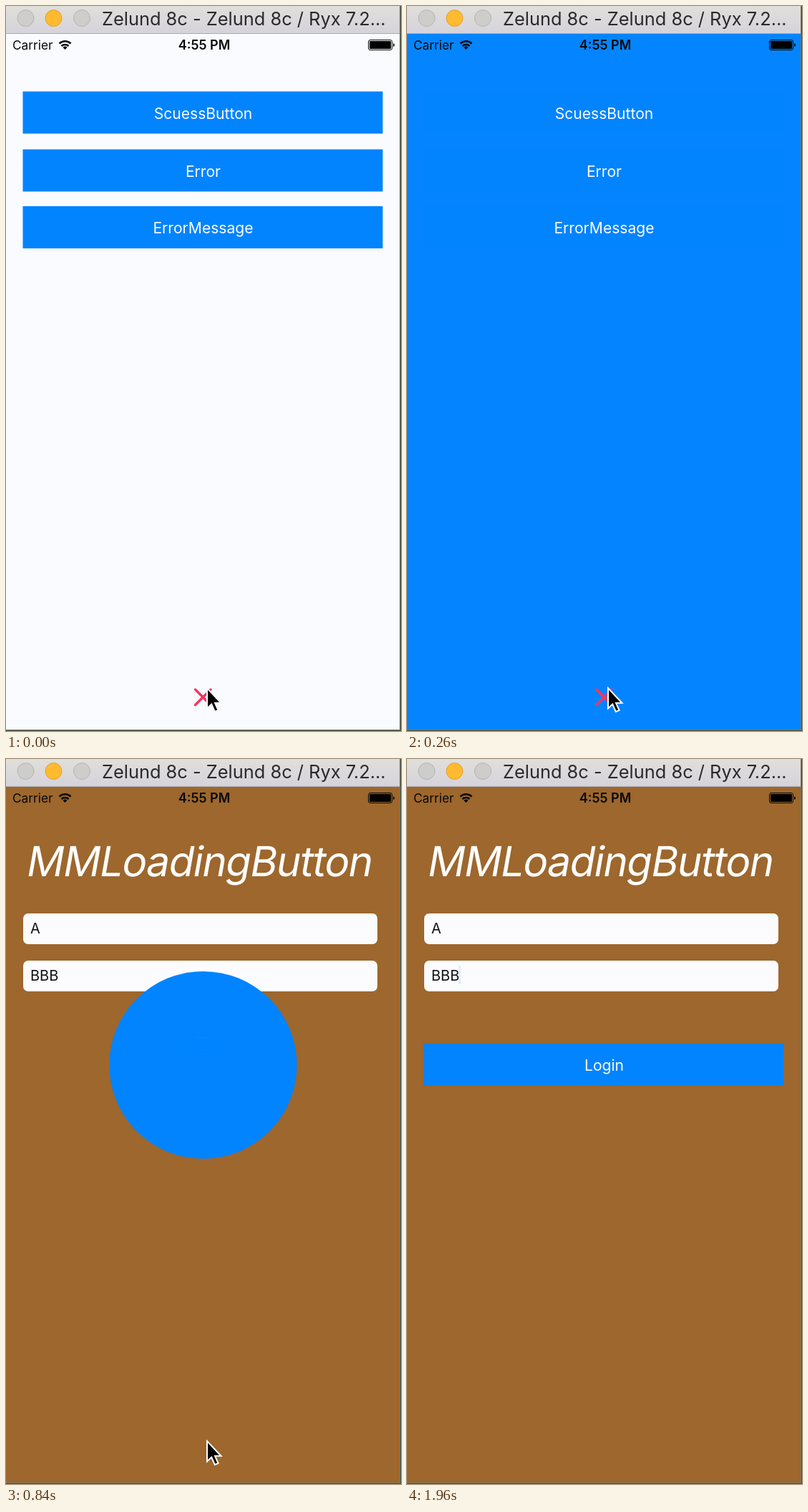
Animation of 552x1014 px, one loop 1980 ms. Source, as an HTML page:

```html
<!DOCTYPE html>
<html lang="en">
<head>
<meta charset="utf-8">
<title>Loading button</title>
<style>
  html, body { margin: 0; width: 100%; height: 100%; overflow: hidden; background: #9d672d; }
  svg { display: block; width: 552px; height: 1014px; font-family: Inter, "Noto Sans", sans-serif; }
  .label { font-size: 21.1px; fill: #fcfcff; text-anchor: middle; }
  .entry { font-size: 20px; fill: #111; }
  .light { fill: #cdcdcb; stroke: #b4b4b0; }
  .blue { fill: #0284ff; }
</style>
</head>
<body>
<svg viewBox="0 0 552 1014">
  <defs>
    <linearGradient id="bar" x2="0" y2="1">
      <stop stop-color="#e0dfda"/>
      <stop offset="1" stop-color="#d5d3db"/>
    </linearGradient>
    <clipPath id="screen"><rect y="39" width="550" height="973"/></clipPath>
  </defs>

  <g clip-path="url(#screen)">
    <rect y="39" width="550" height="973" fill="#9d672d"/>
    <text transform="translate(26.5 164) skewX(-10)" font-size="58" letter-spacing="-1.4" fill="#fff">MMLoadingButton</text>
    <g fill="#fcfcff">
      <rect x="24" y="216" width="495" height="43" rx="7"/>
      <rect x="24" y="282" width="495" height="43" rx="7"/>
    </g>
    <text class="entry" x="34" y="244">A</text>
    <text class="entry" x="34" y="310">BBB</text>
    <rect id="caret" x="72.5" y="289" width="2.5" height="26" fill="#426bf2"/>

    <rect id="login" class="blue"/>
    <text id="loginText" class="label" x="275.5" y="436">Login</text>

    <circle id="disc" cx="275.5" cy="428"/>
    <g id="page">
      <g id="buttons"></g>
      <path d="M264.5 956l21.5 21.5M286 956l-21.5 21.5" stroke="#f5365f" stroke-width="3.5" stroke-linecap="round"/>
    </g>
  </g>

  <!-- status bar -->
  <text x="9" y="60.5" font-size="17.3" fill="#080808">Carrier</text>
  <text x="277" y="60.5" font-size="18" font-weight="600" text-anchor="middle" fill="#080808">4:55 PM</text>
  <g fill="none" stroke="#080808" stroke-width="2.6">
    <path d="M74.5 52.5a11.5 11.5 0 0 1 16 0M77.5 56a7.2 7.2 0 0 1 10 0"/>
    <path d="M82.5 61l-3-3a4.300 4.300 0 0 1 6 0z" fill="#080808" stroke="none"/>
  </g>
  <rect x="506.5" y="47.5" width="33" height="14" rx="2.5" fill="none" stroke="#080808"/>
  <rect x="508" y="49" width="30" height="11" rx="1" fill="#000"/>
  <path d="M541 52q2 .5 2 2.5t-2 2.5z" fill="#080808"/>

  <!-- window frame -->
  <rect width="550" height="39" fill="url(#bar)"/>
  <rect y="38" width="550" height="1" fill="#aaa8ae"/>
  <circle class="light" cx="27.5" cy="17" r="11.5"/>
  <circle cx="66.5" cy="17" r="11.5" fill="#ffba30" stroke="#e2a02b"/>
  <circle class="light" cx="106" cy="17" r="11.5"/>
  <text x="134" y="27" font-size="25.4" fill="#29292c">Zelund 8c - Zelund 8c / Ryx 7.2...</text>
  <path d="M550.5 0V1012.5H0" fill="none" stroke="#747a68"/>
  <path d="M551.5 0V1013.5H0" fill="none" stroke="#464d3e"/>

  <path id="pointer" d="M281 954v28.5l6.2-6 4.600 10.5 4.800-2-4.600-10.2h8.5z" fill="#000" stroke="#fff" stroke-width="2"/>
</svg>
<script>
const LOOP = 1980;
const WHITE = [252, 252, 255], BLUE = [2, 132, 255];
const CENTER = { x: 275.5, y: 428 };
const BUTTON = { width: 503, height: 59, grow: 33 };
const SHRINK_START = 328, SHRINK_END = 994, LOGIN_READY = 1100;
const $ = id => document.getElementById(id);

$('buttons').innerHTML = [['ScuessButton', 119.5], ['Error', 200.5], ['ErrorMessage', 280]]
  .map(([name, y]) => `<rect class="blue" x="23.5" y="${y}" width="503" height="59"/>
    <text class="label" x="275.5" y="${y + 38}">${name}</text>`).join('');

const clamp = v => Math.min(1, Math.max(0, v));
const span = (t, from, to) => clamp((t - from) / (to - from));
const mix = (a, b, p) => a + (b - a) * p;
const setAttrs = (el, attrs) => Object.entries(attrs).forEach(([k, v]) => el.setAttribute(k, v));
const show = (id, opacity) => $(id).setAttribute('opacity', opacity);

// cubic-bezier(.42, 0, .58, 1), solved by bisection
function easeInOut(x) {
  let lo = 0, hi = 1, s = x;
  for (let i = 0; i < 20; i++) {
    s = (lo + hi) / 2;
    const bx = 1.26 * s * (1 - s) ** 2 + 1.74 * s * s * (1 - s) + s ** 3;
    if (bx < x) lo = s; else hi = s;
  }
  return s * s * (3 - 2 * s);
}

function render(t) {
  const tint = easeInOut(span(t, -20, 280));
  const scale = mix(1, 1 / BUTTON.grow, easeInOut(span(t, SHRINK_START, SHRINK_END)));
  const covering = t < SHRINK_END;

  setAttrs($('disc'), {
    r: 29 * BUTTON.grow * scale,
    fill: `rgb(${WHITE.map((c, i) => Math.round(mix(c, BLUE[i], tint)))})`,
    opacity: +covering
  });
  setAttrs($('page'), {
    transform: `translate(${CENTER.x} ${CENTER.y}) scale(${scale}) translate(${-CENTER.x} ${-CENTER.y})`,
    opacity: span(scale, 0.12, 0.4)
  });

  const open = span(t, SHRINK_END, LOGIN_READY);
  const width = mix(BUTTON.height, BUTTON.width, open);
  setAttrs($('login'), {
    x: CENTER.x - 0.5 - width / 2, y: 398, width, height: BUTTON.height,
    rx: BUTTON.height / 2 * (1 - open), opacity: +!covering
  });
  show('loginText', +(open === 1));
  show('pointer', +(t < LOGIN_READY));
  show('caret', t < LOGIN_READY ? 0 : 1 - span(t, 1780, 1990));
}

let start;
function tick(now) {
  start ??= now;
  render((now - start) % LOOP);
  requestAnimationFrame(tick);
}
render(0);
requestAnimationFrame(tick);
</script>
</body>
</html>
```
